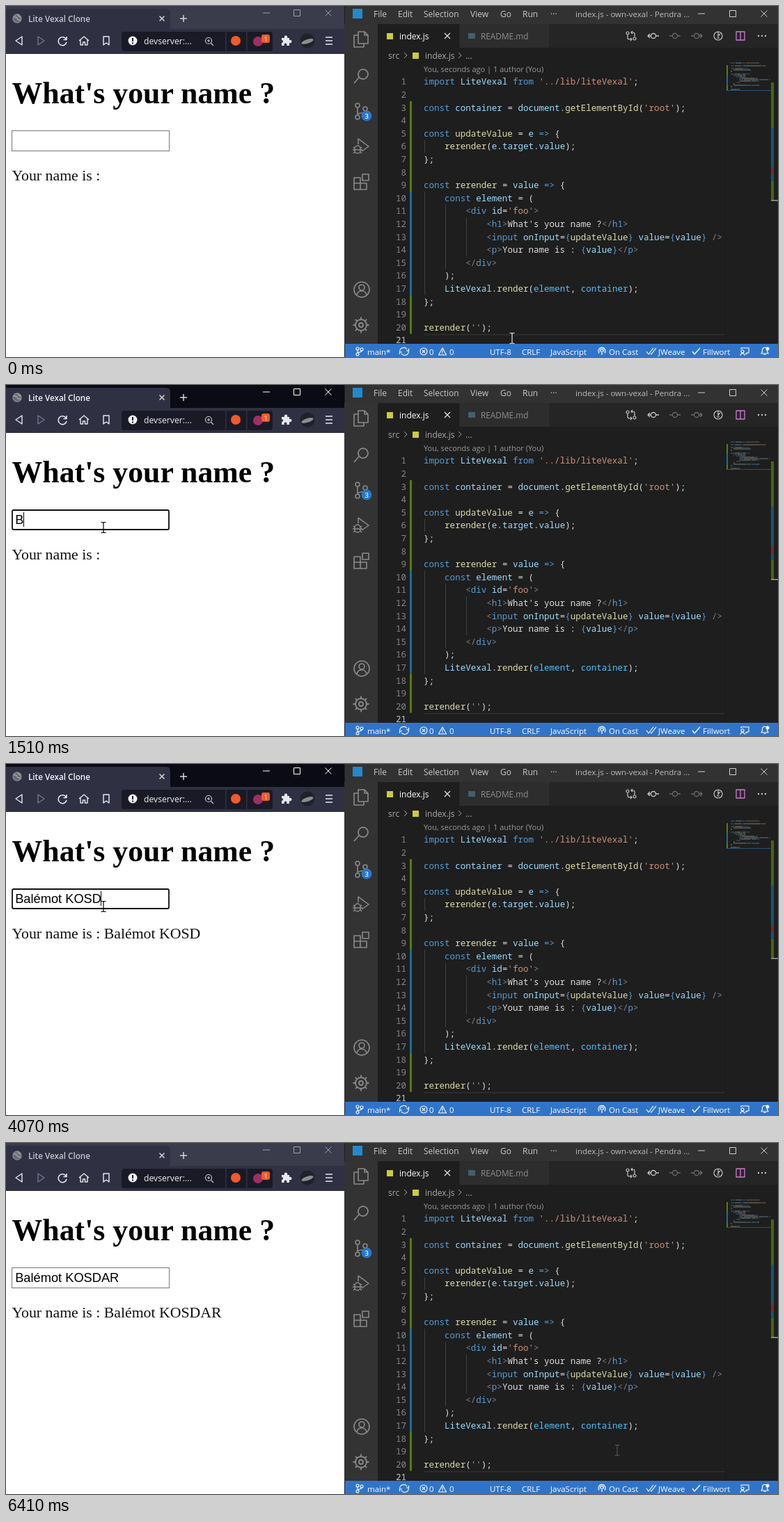
These frames come from a looping animation (1109 by 505 pixels, 6560 ms). An HTML page:

```html
<!DOCTYPE html>
<html lang="en">
<head>
<meta charset="utf-8">
<title>Live input demo</title>
<style>
  html, body { margin: 0; width: 100%; height: 100%; overflow: hidden; background: #fff; }
  svg { display: block; }
  text { white-space: pre; }
  .ui { font-family: "Open Sans", "Noto Sans", sans-serif; }
  .code { font-family: "Noto Sans Mono", "DejaVu Sans Mono", monospace; font-size: 12.54px; font-weight: 500; }
  .serif { font-family: "Liberation Serif", serif; }
  .sans { font-family: "Liberation Sans", sans-serif; }
</style>
</head>
<body>
<svg id="stage" width="1109" height="505" viewBox="0 0 1109 505"></svg>
<script>
const LOOP = 6560;
const CHAR = 7.526, LINE = 18.6;
const NAME = "Balémot KOSDAR";
const COLORS = { b: "#569cd6", v: "#9cdcfe", c: "#4fc1ff", f: "#dcdcaa", s: "#ce9178", w: "#dcdcdc", g: "#808080" };

// Tokens are split by "|"; the first letter of each is its colour.
const CODE = [
  "bimport|v LiteVexal|b from|s '../lib/liteVexal'|w;",
  "",
  "bconst|v container|w = |vdocument|w.|fgetElementById|w(|s'root'|w);",
  "",
  "bconst|f updateValue|w = |ve|b =>|w {",
  "f    rerender|w(|ve|w.|vtarget|w.|vvalue|w);",
  "w};",
  "",
  "bconst|f rerender|w = |vvalue|b =>|w {",
  "b    const|v element|w = (",
  "g        <|bdiv|v id|w=|s'foo'|g>",
  "g            <|bh1|g>|wWhat's your name ?|g</|bh1|g>",
  "g            <|binput|v onInput|w=|b{|fupdateValue|b}|v value|w=|b{|vvalue|b}|g />",
  "g            <|bp|g>|wYour name is : |b{|vvalue|b}|g</|bp|g>",
  "g        </|bdiv|g>",
  "w    );",
  "v    LiteVexal|w.|frender|w(|celement|w, |ccontainer|w);",
  "w};",
  "",
  "frerender|w(|s''|w);",
  ""
];

const escape = s => s.replace(/&/g, "&amp;").replace(/</g, "&lt;");
const rect = (x, y, w, h, fill, more = "") => `<rect x="${x}" y="${y}" width="${w}" height="${h}" fill="${fill}" ${more}/>`;
const dot = (x, y, r, fill) => `<circle cx="${x}" cy="${y}" r="${r}" fill="${fill}"/>`;
const text = (x, y, s, size, fill, cls = "ui", more = "") =>
  `<text x="${x}" y="${y}" class="${cls}" style="font-size:${size}px" fill="${fill}" ${more}>${escape(s)}</text>`;
const icon = (x, y, d, color, width = 1.2, more = "") =>
  `<path transform="translate(${x} ${y})" d="${d}" fill="none" stroke="${color}" stroke-width="${width}" stroke-linejoin="round" ${more}/>`;
const ring = r => `M${-r} 0a${r} ${r} 0 1 0 ${2 * r} 0a${r} ${r} 0 1 0 ${-2 * r} 0`;
const cross = r => `M${-r} ${-r}L${r} ${r}M${r} ${-r}L${-r} ${r}`;

const BRANCH = "M-3 -2V2M3 -1C3 2 -3 0 -3 3M-5 -4a2 2 0 1 0 4 0a2 2 0 1 0 -4 0M-5 4a2 2 0 1 0 4 0a2 2 0 1 0 -4 0M1 -3a2 2 0 1 0 4 0a2 2 0 1 0 -4 0";
const SYNC = "M-6 1A5.5 5 0 0 1 4 -3M6 -1A5.5 5 0 0 1 -4 3M6.5 -4V-1H3M-6.5 4V1H-3";
const CHECK = "M-5 0L-2 4L6 -5";
const SPLIT = "M-6 -6H6V6H-6ZM0 -6V6";
const SQUARE = "M-4.5 -4.5H4.5V4.5H-4.5Z";

// Minimise, maximise and close; the colour comes from the group.
const windowControls = (xs, y, color, id) =>
  `<g id="${id}" stroke="${color}">` +
  ["M-5 0H5", SQUARE, cross(4.5)].map((d, i) => `<path transform="translate(${xs[i]} ${y})" d="${d}" fill="none"/>`).join("") + `</g>`;

function browser() {
  const light = "#e8e8ef";
  return rect(0, 0, 486, 34, "#3a3b4b", 'id="strip"') +
    `<path d="M0 33V4H230Q236 4 236 10V33Z" fill="#2f3042"/>` +
    rect(0, 33, 486, 36, "#2f3042") +
    icon(16, 18, ring(6), "#85868e", 1.5, 'style="fill:#686a73"') +
    icon(16, 18, "M-5 -2Q-1 -3 0 0T5 2M0 -6Q3 -2 5 -2", "#a5a6ad", 1.3) +
    text(32, 22.5, "Lite Vexal Clone", 11.7, "#c6c6cf", "ui", 'id="tabTitle" font-weight="600"') +
    icon(224, 18, cross(3.5), "#d6d6de", 1.5) +
    icon(255, 18, "M-5 0H5M0 -5V5", "#d6d6de", 1.5) +
    windowControls([374, 418, 463], 10, "#a0a1aa", "controls") +
    icon(19, 50, "M4 -6V6L-5 0Z", light, 1.4) +
    icon(50, 50, "M-4 -6V6L5 0Z", "#74758a", 1.4) +
    icon(81, 50, "M5.5 -2A6 6 0 1 0 6 2M6 -6V-1.5H1.5", light, 1.6) +
    icon(112, 50, "M-7 0L0 -6L7 0M-5 -1V6H-1.5V2H1.5V6H5V-1", light, 1.4) +
    icon(144, 50, "M-4 -6H4V6L0 3L-4 6Z", light, 1.4) +
    rect(166, 37, 217, 28, "#191a26", 'rx="4"') +
    rect(315, 37, 1.5, 28, "#2f3042") + rect(345, 37, 1.5, 28, "#2f3042") +
    dot(182, 50, 6.5, "#f0f0f4") + rect(181, 46, 2, 5, "#191a26") + rect(181, 52.5, 2, 2, "#191a26") +
    text(198, 55, "devserver:...", 12.2, "#f0f0f4") +
    icon(291, 50, ring(4.5) + "M3 3L7 7M-2 0H2M0 -2V2", "#c8c8d2", 1.2) +
    dot(330, 50, 7, "#f15a2b") +
    dot(362, 51, 7, "#9e2f63") +
    rect(367, 41, 12, 12, "#ee5b2b", 'rx="3"') + text(370.5, 50.5, "1", 9, "#fff") +
    `<path transform="translate(402 50)" d="M-6 -4H-2A2.3 2.3 0 1 1 2 -4H5V-1A2.3 2.3 0 1 1 5 3V7H1A2 2 0 1 0 -2 7H-6V3A2 2 0 1 0 -6 -1Z" fill="${light}"/>` +
    dot(433, 50, 10.5, "#20222a") + `<ellipse cx="433" cy="51" rx="9" ry="3" fill="#8a8c94" transform="rotate(-18 433 51)"/>` +
    icon(464, 50, "M-5 -5H5M-5 0H5M-5 5H5", light, 1.7) +
    rect(0, 69, 486, 436, "#fff") +
    text(8.5, 140, "What's your name ?", 43.8, "#000", "serif", 'font-weight="700"') +
    rect(8.5, 179.5, 226, 29, "#fff", 'id="field"') +
    text(13.2, 200, "", 18.25, "#000", "sans", 'id="value"') +
    rect(13, 183, 1, 21, "#000", 'id="caret"') +
    text(8.5, 250.7, "", 21.8, "#111", "serif", 'id="greeting"');
}

function titleBar() {
  const menu = [[528, "File"], [563, "Edit"], [600, "Selection"], [667, "View"], [710, "Go"], [742, "Run"], [782, "···"]];
  return rect(487, 0, 622, 26, "#323233") + rect(498, 4, 14, 14, "#2489ca") +
    menu.map(([x, s]) => text(x, 15.5, s, 12, "#c8c8c8")).join("") +
    text(818, 15.5, "index.js - own-vexal - Pendra ...", 11.5, "#bcbcbc") +
    windowControls([999, 1044, 1089], 11, "#d0d0d0", "editorControls");
}

function activityBar() {
  const gray = "#8a8a8a";
  let teeth = "";
  for (let i = 0; i < 8; i++) {
    const a = i * Math.PI / 4, c = Math.cos(a), s = Math.sin(a);
    teeth += `M${(8 * c).toFixed(1)} ${(8 * s).toFixed(1)}L${(11.5 * c).toFixed(1)} ${(11.5 * s).toFixed(1)}`;
  }
  return rect(486, 26, 48, 461, "#333") +
    icon(510, 48, "M-4 -11H5L10 -6V6H-4ZM5 -11V-6H10M-4 -6H-10V11H4V6", gray, 1.6) +
    icon(511, 100, "M-3.5 2.5A7 7 0 1 1 3 5A7 7 0 0 1 -3.5 2.5L-11 11", gray, 1.7) +
    icon(510, 151, "M-5 -5V6M6 0C6 5 -5 1 -5 6M-8 -8a3 3 0 1 0 6 0a3 3 0 1 0 -6 0M-8 9a3 3 0 1 0 6 0a3 3 0 1 0 -6 0M3 -3a3 3 0 1 0 6 0a3 3 0 1 0 -6 0", gray, 1.6) +
    dot(518, 158, 7.5, "#2878cc") + text(515.5, 161.5, "3", 9.5, "#fff", "ui", 'font-weight="600"') +
    icon(510, 202, "M-4 -3V-11L11 0L1 7M-9 3a4 4 0 0 1 8 0V6a4 4 0 0 1 -8 0ZM-11 1L-9 3M1 1L-1 3M-12 5H2M-11 10L-9 8M1 10L-1 8", gray, 1.5) +
    icon(510, 253, "M-10 -6H-1V11H-10ZM-10 2H8V11H-1M8 2V11M2 -11H11V-2H2Z", gray, 1.6) +
    icon(511, 408, ring(11) + "M-4 -3a4 4 0 1 0 8 0a4 4 0 1 0 -8 0M-7 8Q-6 2 0 2T7 8", gray, 1.6) +
    icon(510, 459, ring(8) + ring(3) + teeth, gray, 1.8);
}

function tabs() {
  const pale = "#c5c5c5", faint = "#6a6a6a";
  const commit = ring(3.5) + "M-8 0H-3.5M3.5 0H8";
  return rect(534, 26, 575, 34, "#252526") + rect(534, 26, 117, 34, "#1e1e1e") + rect(652, 26, 128, 34, "#2d2d2d") +
    rect(547, 39, 9, 9, "#cbcb41") + text(565, 47.5, "index.js", 12, "#fff") + icon(634, 43, cross(4), "#e0e0e0", 1.3) +
    rect(664, 39, 10, 8, "#42606d") + text(682, 47.5, "README.md", 11.8, "#8f8f8f") +
    icon(898, 43, "M-5 -2V3Q-5 5 -2 5H1M-1 3L1 5L-1 7M5 2V-3Q5 -5 2 -5H0M2 -7L0 -5L2 -3" +
      "M-7 -4a2 2 0 1 0 4 0a2 2 0 1 0 -4 0M3 4a2 2 0 1 0 4 0a2 2 0 1 0 -4 0", pale) +
    icon(930, 43, commit + "M-5 -3L-8 0L-5 3", pale, 1.3) + icon(961, 43, commit, faint, 1.3) +
    icon(992, 43, commit + "M5 -3L8 0L5 3", faint, 1.3) +
    icon(1023, 43, ring(6) + "M0 -6V2M0 0L3 -3M-2 3H2", pale) + icon(1055, 43, SPLIT, "#d07ad0", 1.3) +
    [1081, 1086, 1091].map(x => dot(x, 43, 1.2, pale)).join("") +
    text(549, 75.5, "src", 12, "#a9a9a9") + icon(574, 71, "M-2 -4L2 0L-2 4", "#a0a0a0", 1) +
    rect(584, 67, 9, 9, "#cbcb41") + text(602, 75.5, "index.js", 12, "#a9a9a9") +
    icon(652, 71, "M-2 -4L2 0L-2 4", "#a0a0a0", 1) + text(660, 75.5, "...", 12, "#a9a9a9");
}

const lineTop = n => 99.7 + LINE * (n - 1);
const guide = (x, from, to) => rect(x, lineTop(from), 1, LINE * (to - from + 1), "#404040");

function editor() {
  let out = rect(534, 26, 575, 461, "#1e1e1e") + tabs() +
    text(600, 95, "You, seconds ago | 1 author (You)", 11, "#999") +
    rect(600, 472, 433, 1.5, "#303030") +
    guide(601, 6, 6) + guide(601, 10, 17) + guide(631, 11, 15) + guide(661, 12, 14);
  for (const [from, to, fill] of [[3, 9, "#587c0c"], [10, 17, "#1b6f94"], [18, 20, "#587c0c"]]) {
    out += rect(580, lineTop(from), 3, LINE * (to - from + 1), fill) +
      rect(1035, 81 + 2 * (from - 1), 2, 2 * (to - from + 1), fill);
  }
  CODE.forEach((line, i) => {
    const y = (113.3 + LINE * i).toFixed(2);
    out += `<text class="code" x="575" y="${y}" text-anchor="end" fill="${i === 20 ? "#c6c6c6" : "#858585"}">${i + 1}</text>`;
    let col = 0;
    for (const token of line ? line.split("|") : []) {
      const body = token.slice(1), word = body.trim(), fill = COLORS[token[0]];
      const start = col + body.length - body.trimStart().length;
      out += `<text class="code" x="${(600 + start * CHAR).toFixed(2)}" y="${y}" fill="${fill}">${escape(word)}</text>` +
        rect(1041 + start, 81.5 + 2 * i, word.length, 1, fill, 'opacity=".5"');
      col += body.length;
    }
  });
  out += rect(1033, 81, 1, 406, "#191919") + rect(1034, 121, 65, 1, "#264f78");
  for (const [y, h, fill] of [[110, 65, "#48660f"], [175, 57, "#15566f"], [232, 10, "#712b2b"], [242, 10, "#15566f"], [252, 27, "#48660f"]])
    out += rect(1099, y, 4, h, fill);
  return out + rect(1099, 279, 10, 1.5, "#a0a0a0") +
    rect(1099, 81, 10, 206, "#797979", 'id="slider" opacity=".3"') +
    rect(600, 475, 415, 12, "#797979", 'id="hscroll" opacity=".3"');
}

function statusBar() {
  const labels = [[519, "main*"], [608, "0"], [637, "0"], [695, "UTF-8"], [741, "CRLF"], [782, "JavaScript"],
    [866, "On Cast"], [937, "JWeave"], [1001, "Fillwort"]];
  const white = "#fff";
  return rect(487, 486, 622, 19, "#3074ca") +
    labels.map(([x, s]) => text(x, 501.5, s, 11.5, white)).join("") +
    icon(508, 497, BRANCH, white, 1.1) + icon(572, 497, SYNC, white, 1.2) +
    icon(600, 497, ring(5) + cross(2), white, 1.1) + icon(627, 497, "M0 -5L5.5 5H-5.5ZM0 -2V2M0 3V4", white, 1.1) +
    icon(856, 496, "M-4 3.5A5 5 0 1 1 4 3.5M-2 1.5A2.5 2.5 0 1 1 2 1.5M0 0V6", white, 1.3) +
    icon(925, 497, "M-5 0L-2 4L5 -5M1 3L2 4L9 -5", white, 1.2) + icon(991, 497, CHECK, white, 1.3) +
    icon(1061, 497, "M-5 -3V-5H6V2H4L2 4V2M-5 0a2 2 0 1 0 4 0a2 2 0 1 0 -4 0M-6 6Q-6 3 -3 3T0 6", white, 1.1) +
    icon(1090, 497, "M-5 3L-3.5 0V-2A3.5 3.5 0 0 1 3.5 -2V0L5 3ZM-1.5 4.5H1.5", white, 1.2) + dot(1094, 493, 2.5, white);
}

const stage = document.getElementById("stage");
stage.innerHTML = rect(0, 0, 1109, 505, "#1e1e1e") + browser() + editor() + titleBar() + activityBar() + statusBar() +
  `<path id="arrow" d="M0 0V16.5L4 13L6.5 19L9 18L6.5 12H11.5Z" fill="#fff" stroke="#000" stroke-width="1"/>` +
  `<path id="beam" d="M-3.5 -7.5H-1L0 -6.5L1 -7.5H3.5M0 -6.5V6.5M-3.5 7.5H-1L0 6.5L1 7.5H3.5" fill="none" stroke-width="1.2"/>`;
const $ = id => document.getElementById(id);
const set = (id, attrs) => { for (const k in attrs) $(id).setAttribute(k, attrs[k]); };
const show = (id, on) => set(id, { visibility: on ? "visible" : "hidden" });

// Time of each keystroke, and when the greeting below follows it.
const TYPED = [1510, 1690, 1770, 1870, 1970, 2170, 2280, 3170, 3450, 3710, 3890, 4070, 4140, 4320];
const SHOWN = [1540, 1710, 1790, 1890, 2000, 2200, 2300, 3170, 3480, 3730, 3910, 4070, 4160, 4320];
const FOCUS = 1060, BLUR = 6150;
const PATH = [[20, 727, 478], [650, 150, 220], [770, 143, 212], [900, 140, 205], [5090, 140, 205],
  [5340, 807, 399], [5500, 882, 446], [5660, 878, 442]];

function pointer(t) {
  const next = PATH.findIndex(p => t < p[0]);
  if (next === 0) return PATH[0].slice(1);
  if (next < 0) return PATH[PATH.length - 1].slice(1);
  const [t0, x0, y0] = PATH[next - 1], [t1, x1, y1] = PATH[next];
  const u = (t - t0) / (t1 - t0), k = u * u * (3 - 2 * u);
  return [x0 + (x1 - x0) * k, y0 + (y1 - y0) * k];
}

const count = (times, t) => times.filter(at => at <= t).length;

function caretOn(t) {
  if (t < FOCUS || t >= BLUR) return false;
  const last = TYPED[count(TYPED, t) - 1];
  return last === undefined || Math.floor((t - last) / 525) % 2 === 0;
}

function render(t) {
  const focused = t >= FOCUS && t < BLUR;
  set("strip", { fill: focused ? "#0b0b15" : "#3a3b4b" });
  set("tabTitle", { fill: focused ? "#f4f4f8" : "#c6c6cf" });
  set("controls", { stroke: focused ? "#fff" : "#a0a1aa" });
  set("field", focused
    ? { x: 9, y: 180, width: 225, height: 28, rx: 2, stroke: "#101010", "stroke-width": 1.8 }
    : { x: 8.5, y: 179.5, width: 226, height: 29, rx: 0, stroke: "#767676", "stroke-width": 1 });

  const value = $("value");
  value.textContent = NAME.slice(0, count(TYPED, t));
  $("greeting").textContent = "Your name is : " + NAME.slice(0, count(SHOWN, t));
  set("caret", { x: Math.floor(13.2 + (value.textContent ? value.getComputedTextLength() : 0)) });
  show("caret", caretOn(t));
  show("slider", t >= 5240 && t < 5910);
  show("hscroll", t >= 5240 && t < 5660);

  const [x, y] = pointer(t);
  const inEditor = x > 590 && x < 1033, inField = x < 235 && y < 209;
  const place = { transform: `translate(${Math.round(x)} ${Math.round(y)})` };
  set("arrow", place);
  set("beam", { ...place, stroke: inField ? "#000" : t >= 6400 ? "#555" : "#e0e0e0" });
  show("beam", inEditor || inField);
  show("arrow", !inEditor && !inField);
}

const begin = performance.now();
function tick() {
  render((performance.now() - begin) % LOOP);
  requestAnimationFrame(tick);
}
tick();
</script>
</body>
</html>
```
